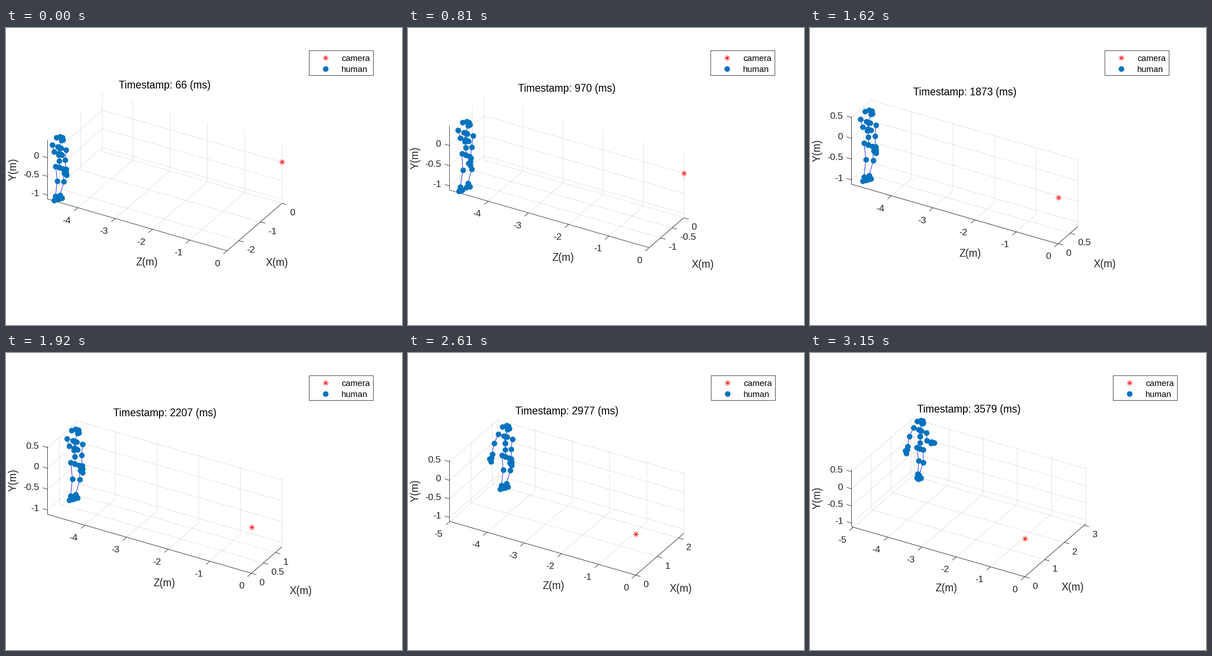
Animation, 864 px wide and 648 px high, one loop 3180 ms. Source, as a matplotlib script:

```python
import numpy as np
import matplotlib.pyplot as plt
from matplotlib.animation import FuncAnimation
from matplotlib.collections import LineCollection
from matplotlib.patches import Rectangle

plt.rcParams["font.family"] = "Liberation Sans"
STEP, FRAMES = 30, 106
INK, DOT = "#262626", "#0072BD"
TICK_PX, LABEL_PX, LEGEND_PX = 20.6, 22.6, 18.6
LEFT, RIGHT, MID_Y = 90, 601.6, 312.9
COS, SIN = np.sqrt(3) / 2, 0.5      # azimuth and elevation are both 30 degrees

# Rows: where a metre along x (forward), y (up), z (side) goes on the stage
VIEW = np.array([(SIN / COS, -SIN), (0, -1), (1, SIN * SIN / COS)])

# Walked path: time in ms, then the pelvis x, y, z in metres
ROUTE = np.array([
    (0, -2.418, -0.259, -4.575), (810, -1.208, -0.302, -4.72),
    (1290, -0.397, -0.197, -4.475), (1620, 0.265, -0.224, -4.72),
    (2250, 1.269, -0.18, -4.565), (2610, 2.19, -0.386, -4.77),
    (3150, 3.04, -0.283, -4.813)])
STRIDE = 960                        # ms for two steps


def pelvis_at(t):
    """Smooth cubic through the route points."""
    time, keys = ROUTE[:, 0], ROUTE[:, 1:]
    i = min(np.searchsorted(time, t, "right") - 1, len(time) - 2)
    h = time[i + 1] - time[i]
    s = (t - time[i]) / h
    m = np.gradient(keys, time, axis=0) * h
    return (keys[i] * (1 + 2 * s) * (1 - s) ** 2 + m[i] * s * (1 - s) ** 2
            + keys[i + 1] * s * s * (3 - 2 * s) + m[i + 1] * s * s * (s - 1))


def ease(t, start, span):
    s = np.clip((t - start) / span, 0, 1)
    return s * s * (3 - 2 * s)


def ticks(lo, hi, step):
    k = np.arange(np.ceil(lo / step - 1e-6), np.floor(hi / step + 1e-6) + 1)
    return np.round(k * step, 3) + 0.0


def label_width(s):
    return TICK_PX * sum({"-": 0.333, ".": 0.278}.get(c, 0.556) for c in s)


class Box:
    """Tight plot box around body and camera, fitted to the stage."""

    def __init__(self, t):
        x, _, z = pelvis_at(t)
        self.x0 = min(0, x - 0.13 - 0.15 * ease(t, 0, 800))
        self.x1 = max(0, x + 0.55 - 0.5 * ease(t, 2200, 450))
        self.y0, self.y1 = -1.105, 0.475 + 2.7e-5 * t
        self.z0 = z - 0.24
        dx, dy = self.x1 - self.x0, self.y1 - self.y0
        if self.x0 < -0.1:
            step = 1 if dx > 1.85 else 0.5 if dx > 1 else 0.2
        else:
            step = 1 if dx > 1.3 else 0.5
        self.xt = ticks(self.x0, self.x1, step)
        self.yt = ticks(self.y0, self.y1, 0.5)
        self.zt = ticks(self.z0, 0, 1)

        # the x label must stay on its side of the legend
        self.tick_w = max(label_width(f"{v:g}") for v in self.xt)
        self.right = RIGHT
        for _ in range(6):
            s = (self.right - LEFT) / (SIN * dx - COS * self.z0)
            self.x_len = SIN * s * dx
            self.right = min(RIGHT, 580.4 + 0.77 * self.x_len
                             - 1.05 * self.tick_w)
        self.z_len = -self.z0 * COS * s
        self.unit = COS * s
        height = s * (COS * SIN * dx - SIN * SIN * self.z0 + COS * dy)
        self.top = MID_Y - height / 2
        self.corner = np.array([LEFT + self.z_len, MID_Y + height / 2])

    def project(self, p):
        return self.corner + self.unit * ((p - np.array(
            [self.x0, self.y0, 0])) @ VIEW)

    def at(self, x, y, z):
        return self.project(np.array([x, y, z]))


def vec(x, y, z=0.0):
    return np.array([x, y, z])


def bone(length, degrees):
    """Bone hanging down, turned forward by the given angle."""
    a = np.radians(degrees)
    return length * vec(np.sin(a), -np.cos(a))


def arm(shoulder, upper, bend):
    elbow = shoulder + bone(0.25, upper)
    fore = bone(0.44, upper + bend)
    wrist, hand = elbow + 0.6 * fore, elbow + 0.8 * fore
    thumb = hand + vec(-0.03, -0.02, -0.03)
    return [shoulder, elbow, wrist, hand, elbow + fore], [wrist, thumb]


def leg(hip, knee, ankle):
    knee, ankle = hip + knee, hip + ankle
    return ([hip, knee, ankle, ankle + vec(0.08, -0.12)],
            [ankle, ankle + vec(-0.06, -0.075)])


def body(t):
    """Chains of joints in metres; a is the far side, b the near one."""
    pelvis = pelvis_at(t)
    swing = np.cos(2 * np.pi * (t - 1290) / STRIDE)
    step = swing * (1 - ease(t, 2500, 650))
    drop = ease(t, 1900, 750)       # the far arm falls back

    neck = pelvis + vec(0, 0.54)
    head = neck + vec(0.08, 0.155, 0.015)
    side = vec(-0.02, 0, 0.2)
    spine = [neck + (pelvis - neck) * f for f in (0, 0.34, 0.67, 1)]
    face = [head + vec(0, y, z) for y, z in
            ((0.03, 0.04), (0.087, 0.025), (0.09, -0.035), (0.03, -0.14))]

    arm_a = arm(neck - side, 22 - 75 * drop, 32)
    arm_b = arm(neck + side, -4 + 13 * swing, 29 + 20 * swing)
    leg_a = leg(pelvis - side / 2, vec(0.1 + 0.06 * step, -0.43),
                vec(0.06 + 0.13 * step, -0.8))
    leg_b = leg(pelvis + side / 2, vec(-0.1 * step, -0.37),
                vec(-0.2 - 0.13 * step, -0.64))

    chains = [spine, [neck, head, *face]]
    for s, (limb, thumb) in ((-0.22, arm_a), (0.22, arm_b)):
        chains += [[spine[1], neck + s * side, *limb], thumb]
    for limb, heel in (leg_a, leg_b):
        chains += [[pelvis, *limb], heel]
    return [np.array(c) for c in chains]


fig = plt.figure(figsize=(12, 9), dpi=72, facecolor="white")
ax = fig.add_axes([0, 0, 1, 1])
ax.set_xlim(-0.5, 863.5)
ax.set_ylim(647.5, -0.5)
ax.axis("off")
live = []


def lines(segs, color, width=1.0, z=1, alpha=None):
    live.append(ax.add_collection(LineCollection(
        segs, colors=color, linewidths=width, alpha=alpha, zorder=z)))


def text(x, y, s, size=TICK_PX, ha="center", color=INK, rot=0):
    live.append(ax.text(x, y, s, fontsize=size, ha=ha, va="baseline",
                        color=color, rotation=rot, rotation_mode="anchor",
                        zorder=6))


def marks(xy, star=False, z=4):
    xy = np.atleast_2d(xy)
    look = (dict(marker=(8, 2, 0), ms=12, mew=0.85, mec="red") if star else
            dict(marker="o", ms=12.2, mew=0, mfc=DOT))
    live.extend(ax.plot(xy[:, 0], xy[:, 1], ls="none", zorder=z, **look))


def draw_grid(b):
    at, segs = b.at, []
    for x in b.xt:
        segs.append([at(x, b.y0, 0), at(x, b.y0, b.z0), at(x, b.y1, b.z0)])
    for z in b.zt:
        segs.append([at(b.x0, b.y0, z), at(b.x1, b.y0, z), at(b.x1, b.y1, z)])
    for y in b.yt:
        segs.append([at(b.x0, y, b.z0), at(b.x1, y, b.z0), at(b.x1, y, 0)])
    lines(segs, INK, 1.0, 1, 0.15)


def draw_axes(b):
    at = b.at
    segs = [[at(b.x0, b.y1, b.z0), at(b.x0, b.y0, b.z0), at(b.x0, b.y0, 0),
             at(b.x1, b.y0, 0)]]
    along_x, along_z = np.array([-8.3, 7.2]), np.array([10.6, 3.1])
    for v in b.zt:
        p = at(b.x0, b.y0, v)
        segs.append([p, p + along_x])
        text(p[0] - 15.5, p[1] + 33.5, f"{v:g}", ha="right")
    for v in b.xt:
        p = at(v, b.y0, 0)
        segs.append([p, p + along_z])
        text(p[0] + 16.7, p[1] + 26.5, f"{v:g}", ha="left")
    for v in b.yt:
        p = at(b.x0, v, b.z0)
        segs.append([p, p - along_z])
        text(p[0] - 18.5, p[1] + 2.3, f"{v:g}", ha="right")
    lines(segs, INK, 1.0, 2)

    x_mid = at((b.x0 + b.x1) / 2, b.y0, 0)
    z_mid = at(b.x0, b.y0, b.z0 / 2)
    y_mid = at(b.x0, (b.y0 + b.y1) / 2, b.z0)
    text(x_mid[0] + 62 - 0.27 * b.x_len + 1.05 * b.tick_w,
         x_mid[1] + 61 + 0.2 * b.x_len, "X(m)", LABEL_PX)
    grow = b.z_len - 379
    text(z_mid[0] + 17.5 + 0.218 * grow, z_mid[1] + 87 + 0.085 * grow,
         "Z(m)", LABEL_PX)
    text(22, y_mid[1], "Y(m)", LABEL_PX, rot=90)


def draw_legend(x):
    live.append(ax.add_patch(Rectangle((x, 48), 140, 54, fc="white", ec=INK,
                                       lw=1, zorder=5)))
    marks((x + 36.5, 64), star=True, z=6)
    marks((x + 36.5, 88), z=6)
    text(x + 71.5, 71.7, "camera", LEGEND_PX, "left", "black")
    text(x + 71.5, 96, "human", LEGEND_PX, "left", "black")


def draw(n):
    while live:
        live.pop().remove()
    t = n * STEP
    box = Box(t)
    draw_grid(box)
    draw_axes(box)
    chains = [box.project(c) for c in body(t)]
    lines(chains, "blue", 1.0, 3)
    marks(np.concatenate(chains))
    marks(box.at(0, 0, 0), star=True)
    stamp = int(66.75 + 33.455 * n)
    text((LEFT + box.right) / 2, box.top - 8.5, f"Timestamp: {stamp} (ms)",
         LABEL_PX, color="black")
    draw_legend(np.round(box.right + 58))
    return live


anim = FuncAnimation(fig, draw, frames=FRAMES, init_func=lambda: [],
                     interval=STEP, repeat=True, repeat_delay=0, blit=False)
plt.show()
```
